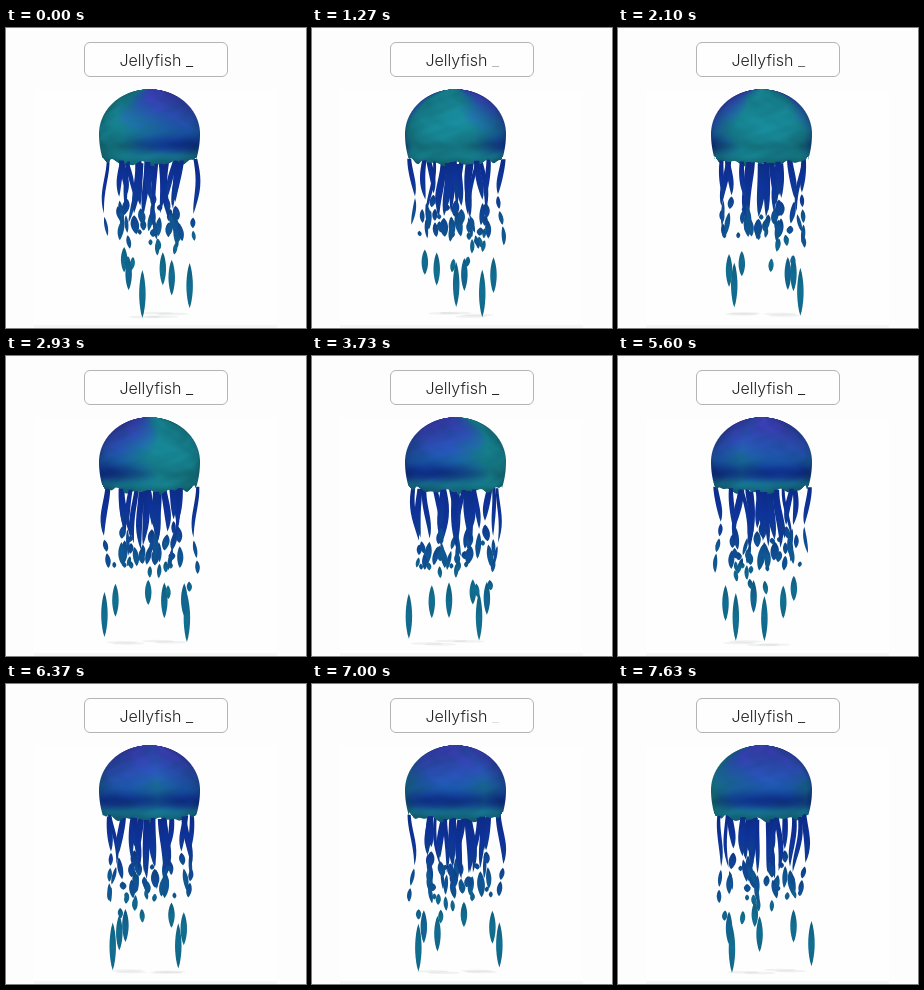
These frames come from a looping animation (300 px wide and 300 px high, 7660 ms). An HTML page with a canvas:

```html
<!DOCTYPE html>
<html lang="en">
<head>
<meta charset="utf-8">
<title>Jellyfish</title>
<style>
  html, body { margin: 0; width: 100%; height: 100%; overflow: hidden; background: #fdfdfd; }
  canvas { position: absolute; left: 0; top: 0; width: 300px; height: 300px; }
  .box {
    position: absolute; left: 78px; top: 14px; width: 144px; height: 35px;
    box-sizing: border-box; border: 1px solid #b4b4b4; border-radius: 6px; background: #fefefe;
  }
  .box p {
    position: absolute; left: 34.5px; top: 6.5px; margin: 0; white-space: pre;
    font: 300 16px/21px Inter, Roboto, sans-serif; color: #222;
  }
</style>
</head>
<body>
<canvas id="stage" width="300" height="300"></canvas>
<div class="box"><p>Jellyfish <span id="cursor">_</span></p></div>
<script>
const LOOP = 7660, SPIN = 42, BLINK = 933;
const CX = 143.5, RAD = Math.PI / 180;
const ctx = document.getElementById('stage').getContext('2d');
const cursor = document.getElementById('cursor');

const clamp = v => Math.max(0, Math.min(1, v));
const mix = (a, b, k) => a + (b - a) * k;
const blend = (a, b, k) => a.map((v, i) => mix(v, b[i], k));
const rgb = c => `rgb(${c.map(Math.round).join()})`;
const bump = (y, at, size) => Math.exp(-(((y - at) / size) ** 2));

function random(seed) {
  let s = seed;
  return () => (s = (s * 16807) % 2147483647) / 2147483647;
}
const rnd = random(90217);
const between = (a, b) => mix(a, b, rnd());

const TEAL = [22, 128, 142], BLUE = [26, 84, 162], VIOLET = [54, 62, 174];
const DEEP = [12, 44, 146], INK = [14, 50, 154], SEA = [18, 112, 146];

// One tapered piece of a strand between two heights
const parts = [];
function addPiece(strand, y0, y1, width, blunt) {
  const teal = clamp((y0 - 150) / 90 + between(-.1, .25));
  parts.push({ ...strand, y0, y1, width, blunt, color: blend(INK, SEA, teal) });
}

function addStrand(angle, radius, top, bottom, width) {
  const strand = { angle, radius, phase: between(0, 6) };
  let y = top;
  while (bottom - y > 6) {
    const end = Math.min(bottom, y + (y === top ? between(34, 60) : between(10, 30)));
    addPiece(strand, y, end, width * between(.8, 1.2), y === top);
    y = end + between(1, 4);
  }
}

// Outer ring, inner cluster, then the long hanging tips
for (let k = 0; k < 6; k++) {
  addStrand(30 + 60 * k, 45, 131, between(200, 224), between(4, 5.2));
  addStrand(60 * k, between(27, 35), 131, between(200, 218), between(5, 7));
  addStrand(20 + 60 * k, between(10, 22), 133, between(196, 234), between(5, 7.5));
}
const TIPS = [[-12, 39, 287], [127, 49, 282], [35, 37, 265], [160, 36, 260], [-40, 34, 260], [233, 33, 246]];
for (const [angle, radius, bottom] of TIPS) {
  const length = (bottom - 200) * .55;
  addPiece({ angle, radius, phase: 0 }, bottom - length, bottom, 6.5);
}
for (let k = 0; k < 12; k++) {
  const y = between(178, 230);
  addPiece({ angle: k * 137.5, radius: between(18, 42), phase: k }, y, y + between(5, 14), between(3.5, 5.5));
}

function point(p, y, turn) {
  const sway = p.phase ? 6 * Math.sin(y / 20 + p.phase) : 0;
  const a = (p.angle + turn + sway) * RAD;
  const r = p.radius + (p.phase ? 2.5 * Math.sin(y / 14 + 2 * p.phase) : 0);
  return [CX + 1 + r * Math.sin(a), y + 3 * Math.cos((p.angle + turn) * RAD)];
}

function drawPiece(p, turn) {
  const n = 10, left = [], right = [];
  for (let i = 0; i <= n; i++) {
    const k = i / n, [x, y] = point(p, mix(p.y0, p.y1, k), turn);
    const shape = p.blunt && k < .45 ? .8 + .2 * Math.sin(k * 3.5) : Math.sin(Math.PI * k) ** .75;
    const w = p.width / 2 * shape;
    left.push([x - w, y]);
    right.unshift([x + w, y]);
  }
  ctx.beginPath();
  for (const [x, y] of [...left, ...right]) ctx.lineTo(x, y);
  ctx.closePath();
  const g = ctx.createLinearGradient(0, p.y0, 0, p.y1);
  g.addColorStop(0, rgb(p.color.map(v => v * .85)));
  g.addColorStop(.5, rgb(p.color));
  g.addColorStop(1, rgb(blend(p.color, SEA, .3).map(v => v * .92)));
  ctx.fillStyle = g;
  ctx.fill();
}

// Bell, shaded per pixel
const BW = 110, BH = 90, BX = 89, BY = 57;
const bell = document.createElement('canvas');
bell.width = BW; bell.height = BH;
const bctx = bell.getContext('2d');
const img = bctx.createImageData(BW, BH);

function halfWidth(y) {
  if (y < 106) return 50.5 * Math.sqrt(Math.max(0, 1 - ((106 - y) / 45) ** 2));
  return 50.5 - 4 * ((y - 106) / 26) ** 2;
}

function texture(lon, y) {
  return .5 * Math.sin(3 * lon + y * .11) + .35 * Math.sin(5 * lon - y * .17 + 1.3)
    + .25 * Math.sin(11 * lon + Math.sin(y * .3) * 2) + .18 * Math.sin(y * .55 + 7 * lon);
}

function bellColor(lon, y, front) {
  const n = texture(lon, y);
  const patch = Math.max(Math.cos(lon - 157 * RAD), .9 * Math.cos(lon - 50 * RAD));
  const top = clamp((104 - y) / 40), hem = clamp((y - 121) / 6);
  const blue = clamp((patch - .1) * 1.2 + top * .4 + n * .12) * (1 - hem * .75);
  let c = blend(TEAL, BLUE, blue);
  c = blend(c, VIOLET, clamp(patch * top * 1.3 + n * top * .3));
  c = blend(c, DEEP, clamp(patch * 1.1) * bump(y, 116, 8) * .75);
  const light = .76 + .2 * front + .12 * front * bump(y, 92, 16) - .08 * bump(y, 118, 5)
    - .2 * clamp((y - 129) / 8) + n * .06;
  return c.map(v => v * light);
}

function drawBell(turn) {
  const d = img.data;
  for (let j = 0; j < BH; j++) {
    const y = BY + j + .5, hw = halfWidth(y);
    if (!hw) continue;
    const slope = y < 100 ? .5 + .5 * clamp((y - 61) / 39) : 1;
    for (let i = 0; i < BW; i++) {
      const o = (j * BW + i) * 4, dx = BX + i + .5 - CX;
      const u = Math.max(-1, Math.min(1, dx / hw));
      const front = Math.sqrt(1 - u * u), lon = Math.asin(u) - turn * RAD;
      const hem = 130 + 6 * front + 1.6 * Math.sin(9 * lon) + 1.2 * Math.sin(16 * lon + 1);
      const cover = clamp((hw - Math.abs(dx)) * slope + .5) * clamp(hem - y + .5);
      d[o + 3] = cover * 255;
      if (cover) bellColor(lon, y, front).forEach((v, k) => { d[o + k] = v; });
    }
  }
  bctx.putImageData(img, 0, 0);
  ctx.drawImage(bell, BX, BY);
}

function drawFloor(turn) {
  ctx.fillStyle = '#fdfdfd';
  ctx.fillRect(0, 0, 300, 300);
  ctx.fillStyle = '#fefefe';
  ctx.fillRect(28, 62, 243, 238);
  ctx.fillStyle = '#f6f6f6';
  ctx.fillRect(28, 297, 243, 3);
  ctx.fillStyle = 'rgba(120,125,130,.1)';
  for (const [angle, radius] of TIPS.slice(0, 4)) {
    const a = (angle + turn) * RAD;
    ctx.beginPath();
    ctx.ellipse(CX + radius * .6 * Math.sin(a), 287 + 2 * Math.cos(a), 16, 1.3, 0, 0, 7);
    ctx.fill();
  }
}

function draw(time) {
  const t = time % LOOP, turn = SPIN * t / 1000;
  const sorted = parts
    .map(p => ({ p, z: Math.cos((p.angle + turn) * RAD) }))
    .sort((a, b) => a.z - b.z);
  drawFloor(turn);
  sorted.filter(s => s.z < .3).forEach(s => drawPiece(s.p, turn));
  drawBell(turn);
  sorted.filter(s => s.z >= .3).forEach(s => drawPiece(s.p, turn));
  cursor.style.opacity = clamp(.68 + .55 * Math.cos(2 * Math.PI * t / BLINK));
}

let start;
function tick(now) {
  if (start === undefined) start = now;
  draw(now - start);
  requestAnimationFrame(tick);
}
draw(0);
requestAnimationFrame(tick);
</script>
</body>
</html>
```
